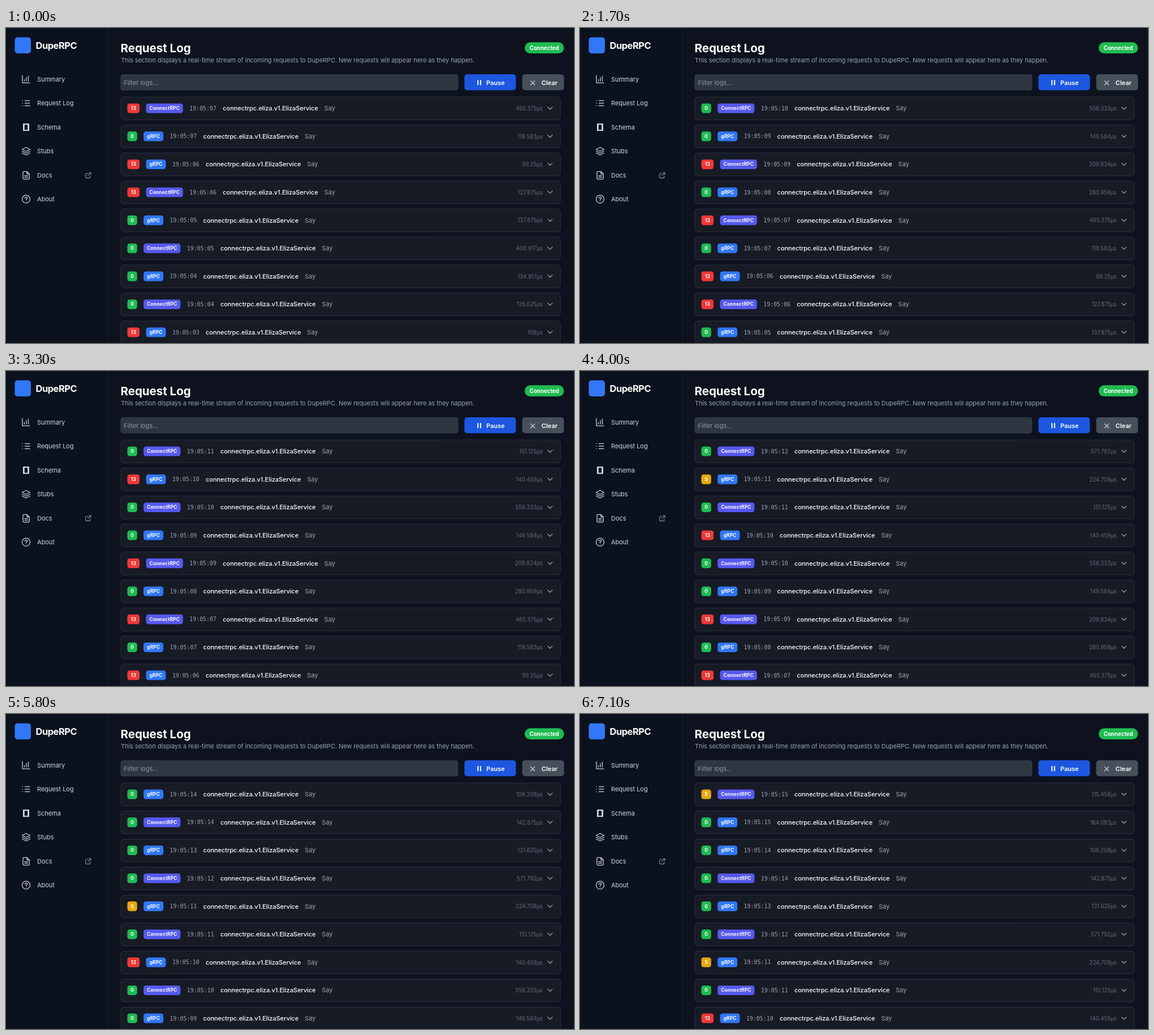
Recreate the animation shown at these times as an HTML page. Size 1004 by 558 pixels, loop 7200 ms.

```html
<!DOCTYPE html>
<html lang="en">
<head>
<meta charset="utf-8">
<title>Request Log</title>
<style>
  html, body { margin: 0; width: 100%; height: 100%; overflow: hidden; background: #0d121e; }
  svg { display: block; width: 1004px; height: 558px; }
  text { font: 400 11px Inter, "Open Sans", sans-serif; fill: #d3d7de; }
  .icon { fill: none; stroke: #d3d7de; stroke-width: 1.25; stroke-linecap: round; stroke-linejoin: round; }
  .brand { font-size: 16.5px; font-weight: 700; letter-spacing: -.5px; fill: #fff; }
  .title { font-size: 20.6px; font-weight: 700; letter-spacing: -.06px; fill: #fff; }
  .lead { letter-spacing: -.088px; fill: #99a1ae; }
  .nav text { letter-spacing: -.04px; }
  .hint { fill: #9299a4; }
  .button { font-weight: 600; fill: #fff; }
  .pill { font-size: 9.7px; font-weight: 700; text-anchor: middle; fill: #fff; }
  .card { fill: #171b26; stroke: #2a303c; }
  .badge { font-size: 8.3px; font-weight: 700; letter-spacing: .2px; text-anchor: middle; fill: #fff; }
  .time { font: 9.95px "DejaVu Sans Mono", monospace; fill: #9ca3af; }
  .service { font-weight: 500; letter-spacing: -.05px; fill: #fff; }
  .method { fill: #9ca3af; }
  .took { font-size: 9.65px; text-anchor: end; fill: #626976; }
  .chevron { stroke: #9ca3af; }
</style>
</head>
<body>
<svg viewBox="0 0 1004 558">
  <rect width="1004" height="558" fill="#0d121e"/>
  <rect width="180" height="558" fill="#0b121e"/>
  <path d="M180.5 0V558" stroke="#191f2c"/>

  <rect x="15.5" y="16.5" width="28.5" height="28.5" rx="5" fill="#3177f6"/>
  <text class="brand" x="52.5" y="37">DupeRPC</text>

  <g class="nav">
    <text x="55" y="94.8">Summary</text>
    <text x="55" y="137.3">Request Log</text>
    <text x="55" y="179.8">Schema</text>
    <text x="55" y="222.3">Stubs</text>
    <text x="55" y="264.8">Docs</text>
    <text x="55" y="307.3">About</text>
  </g>
  <path d="M30 169.3H41V182.3H30ZM32.8 171.4V180.2H38.2V171.4Z" fill="#d3d7de" fill-rule="evenodd"/>
  <g class="icon">
    <path d="M29 84V97H42M32.5 91V94M36 87.5V94M39.5 85V94"/>
    <path d="M33.5 128.5H42M33.5 133H42M33.5 137.5H42M29 128.5h.4M29 133h.4M29 137.5h.4"/>
    <path d="M35.5 211.5L42.5 215L35.5 218.5L28.5 215ZM28.5 218.3L35.5 221.8L42.5 218.3M28.5 221.5L35.5 225L42.5 221.5"/>
    <path d="M37 254.3H31.2Q30 254.3 30 255.5V266.3Q30 267.5 31.2 267.5H40Q41.2 267.5 41.2 266.3V258.5ZM37 254.3V258.5H41.2M32.8 261.5H38.4M32.8 264.3H38.4"/>
    <circle cx="35.5" cy="303.2" r="7"/>
    <path d="M33.4 301.4Q33.6 299.4 35.5 299.4Q37.6 299.5 37.6 301.3Q37.5 302.5 35.5 303.4V304.4M35.5 306.6v.2"/>
    <path d="M144.5 257.5H141.8Q140.8 257.5 140.8 258.5V264.6Q140.8 265.6 141.8 265.6H147.8Q148.8 265.6 148.8 264.6V262M146.5 256.2H150V259.7M150 256.2L144.8 261.4" stroke="#8a93a3" stroke-width="1.1"/>
  </g>

  <text class="title" x="202.5" y="43">Request Log</text>
  <text class="lead" x="203" y="60.6">This section displays a real-time stream of incoming requests to DupeRPC. New requests will appear here as they happen.</text>
  <rect x="916.8" y="25.3" width="69.5" height="19.8" rx="9.9" fill="#1fbb52"/>
  <text class="pill" x="951.5" y="38.8">Connected</text>

  <rect x="202.9" y="82.4" width="595.9" height="27.6" rx="4" fill="#2e3641" stroke="#3f4853" stroke-width=".7"/>
  <text class="hint" x="208.3" y="100.6">Filter logs...</text>
  <rect x="810.3" y="82" width="91" height="28.3" rx="5" fill="#1d57e0"/>
  <path d="M834.2 92.2V101.2M838.8 92.2V101.2" stroke="#fff" stroke-width="2"/>
  <text class="button" x="849" y="100.5">Pause</text>
  <rect x="912.5" y="82" width="73.8" height="28.3" rx="5" fill="#464f5a"/>
  <path class="icon" d="M927.4 93.6L934.6 100.8M934.6 93.6L927.4 100.8"/>
  <text class="button" x="946.6" y="100.5">Clear</text>

  <g id="log"></g>
</svg>
<script>
const LOOP = 7200, PITCH = 49.6, VISIBLE = 9;
const CODES = { 0: ["#1fbb52", 17.3], 5: ["#e6a80e", 17.3], 13: ["#ee3838", 21.7] };
const PROTOCOLS = { ConnectRPC: ["#5659ee", 65.3], gRPC: ["#3177f6", 35] };

// Oldest first: status, protocol initial, second, microseconds, arrival in ms.
const entries = `13 g 03 106
0 C 04 135.625
0 g 04 134.917
0 C 05 400.917
0 g 05 137.875
13 C 06 127.875
13 g 06 99.25
0 g 07 118.583
13 C 07 465.375
0 g 08 280.959 200
13 C 09 209.834 700
0 g 09 149.584 1100
0 C 10 556.333 1600
13 g 10 140.459 2100
0 C 11 151.125 2800
5 g 11 224.708 3400
0 C 12 571.792 3900
0 g 13 131.625 4400
0 C 14 142.875 5400
0 g 14 109.208 5800
0 g 15 184.083 6400
5 C 15 115.458 6900`.split("\n").map(line => {
  const [code, kind, second, took, at = 0] = line.split(" ");
  return { code, name: kind === "C" ? "ConnectRPC" : "gRPC", second, took, at: +at };
});

const label = (cls, x, y, str) => `<text class="${cls}" x="${x}" y="${y}">${str}</text>`;
const badge = (x, str, [color, width]) =>
  `<rect x="${x}" y="133.7" width="${width}" height="17.1" rx="4.2" fill="${color}"/>` +
  label("badge", x + width / 2 + .1, 145.2, str);

function row({ code, name, second, took }) {
  const gap = 11.35;
  const protoX = 214.5 + CODES[code][1] + gap;
  const timeX = protoX + PROTOCOLS[name][1] + gap;
  return `<g><rect class="card" x="203" y="122.2" width="777" height="40.5" rx="5"/>` +
    badge(214.5, code, CODES[code]) +
    badge(protoX, name, PROTOCOLS[name]) +
    label("time", timeX, 145.8, "19:05:" + second) +
    label("service", timeX + 59.1, 146.3, "connectrpc.eliza.v1.ElizaService") +
    label("method", timeX + 238.4, 146.3, "Say") +
    label("took", 948.7, 146, took + "µs") +
    `<path class="icon chevron" d="M957.8 140.2L961.7 144.1L965.6 140.2"/></g>`;
}

const log = document.getElementById("log");
log.innerHTML = entries.map(row).join("");
const rows = [...log.children];
let shown = -1;

function draw(now) {
  const t = now % LOOP;
  const top = entries.filter(e => e.at <= t).length - 1;
  if (top !== shown) {
    shown = top;
    rows.forEach((el, i) => {
      const slot = top - i;
      el.style.display = slot >= 0 && slot < VISIBLE ? "" : "none";
      el.setAttribute("transform", `translate(0 ${slot * PITCH})`);
    });
  }
}

const start = performance.now();
function tick() {
  draw(performance.now() - start);
  requestAnimationFrame(tick);
}
tick();
</script>
</body>
</html>
```
